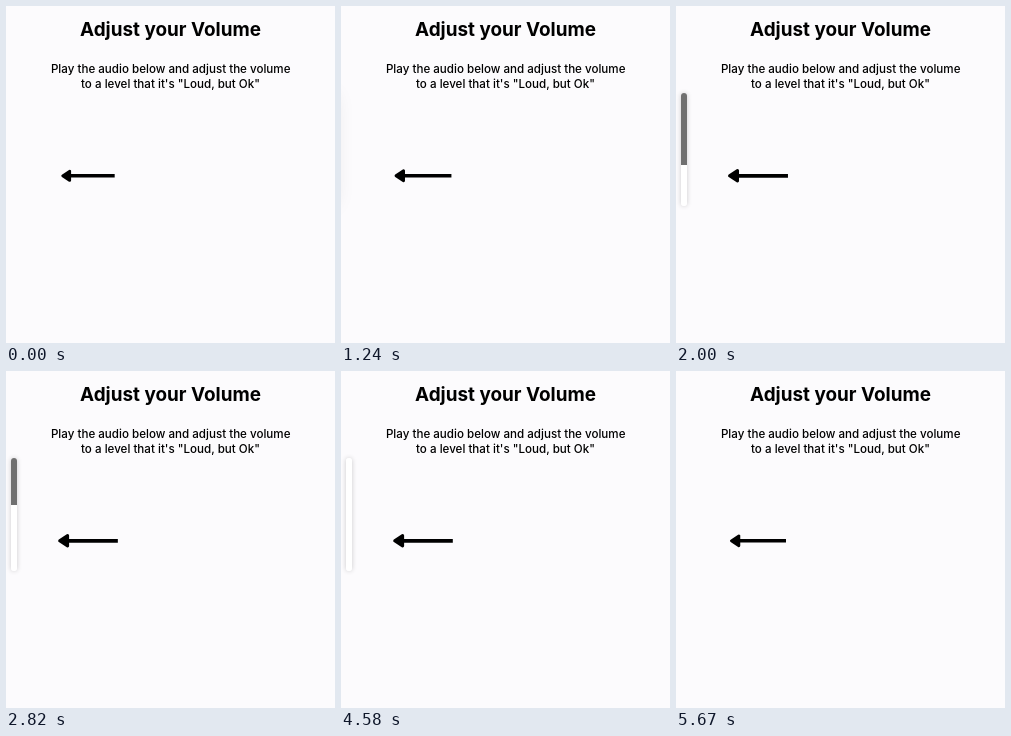
An HTML page for the animation above (5.7 s loop, 329x337 px).

```html
<!DOCTYPE html>
<html lang="en">
<head>
<meta charset="utf-8">
<title>Adjust your Volume</title>
<style>
  html, body { margin: 0; width: 100%; height: 100%; overflow: hidden; background: #fcfbfd; }
  svg { position: absolute; left: 0; top: 0; }
  text {
    font: 500 11.6px Inter, "Noto Sans", sans-serif;
    font-optical-sizing: none;
    text-anchor: middle;
  }
  .title { font-size: 18.9px; font-weight: 700; }
  #bar { position: absolute; top: 87px; height: 113px; }
</style>
</head>
<body>
<svg width="329" height="337">
  <text class="title" x="164.5" y="29.5">Adjust your Volume</text>
  <text x="164.7" y="67.3">Play the audio below and adjust the volume</text>
  <text x="164.5" y="81.6">to a level that it's "Loud, but Ok"</text>
  <g id="arrow">
    <path d="M-20 0H30" stroke="#000" stroke-width="3.8"/>
    <path d="M-28.5 0L-20.5-5.3V5.3Z" stroke="#000" stroke-width="3" stroke-linejoin="round"/>
  </g>
</svg>
<div id="bar"></div>
<script>
const LOOP = 5700, PULSE = 882, PEAK = 218;
const BAR_HEIGHT = 113;
const arrow = document.getElementById('arrow');
const bar = document.getElementById('bar').style;

const mix = (a, b, k) => a + (b - a) * k;
const ramp = (t, from, to) => Math.min(1, Math.max(0, (t - from) / (to - from)));
const smooth = k => k * k * (3 - 2 * k);
const easeOut = k => 1 - (1 - k) ** 3;

// Height of the white fill: one step, a short catch-up, then a steady rise.
function level(t) {
  if (t < 1760) return mix(7, 33.6, ramp(t, 1490, 1760));
  return Math.min(BAR_HEIGHT, 33.6 + (t - 1760) * 0.0307);
}

function draw(t) {
  const wave = Math.cos(2 * Math.PI * (t - PEAK) / PULSE);
  const scale = (26.6 + 3.4 * wave) / 30;
  arrow.setAttribute('transform', `translate(82 169.8) scale(${scale})`);

  const enter = easeOut(ramp(t, 1215, 1420));
  const thin = smooth(ramp(t, 1490, 1740));
  const leave = smooth(ramp(t, 5130, 5480));
  const shift = mix(-75, 0, enter) - 22 * leave;
  const fill = level(t);

  bar.display = t > 1210 && t < 5480 ? 'block' : 'none';
  bar.left = mix(7.5, 4.5, thin) + shift + 'px';
  bar.width = mix(36, 6.5, thin) + 'px';
  bar.borderRadius = mix(9, 3.25, thin) + 'px';
  bar.boxShadow = `0 0 ${mix(20, 5, thin)}px rgba(0,0,0,${mix(0.1, 0.2, thin)})`;
  bar.background = `linear-gradient(to top, #fff ${fill}px, #707070 ${fill}px)`;
}

function tick() {
  draw(performance.now() % LOOP);
  requestAnimationFrame(tick);
}
tick();
</script>
</body>
</html>
```
